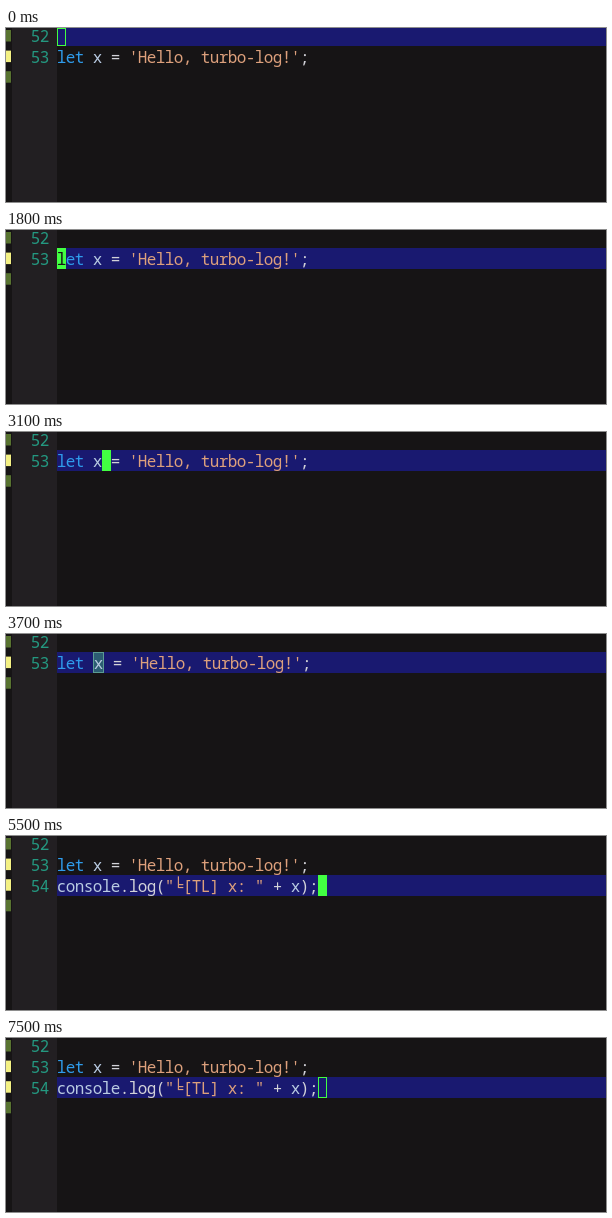
An HTML page with a canvas for the animation above (7.6 s loop, 600 by 174 pixels).

```html
<!DOCTYPE html>
<html lang="en">
<head>
<meta charset="utf-8">
<style>
html, body { margin: 0; width: 100%; height: 100%; overflow: hidden; background: #161415; }
canvas { display: block; }
</style>
</head>
<body>
<canvas id="stage" width="600" height="174"></canvas>
<script>
const ctx = document.getElementById('stage').getContext('2d');
const LOOP = 7600, CELL = 9, LEFT = 51, ROW = 21;
const BLUE = '#2f9cec', PALE = '#b9cbe2', LIGHT = '#d2d2d8', STRING = '#dda07c';
const GREEN = '#42ff42', NAVY = '#191970', DARK = '#161415';
const OLIVE = '#587330', YELLOW = '#f4f184';

const declaration = [['let', BLUE], [' x', PALE], [' = ', LIGHT], ["'Hello, turbo-log!'", STRING], [';', LIGHT]];
const logCall = [['console', PALE], ['.log(', LIGHT], ['"╘[TL] x: "', STRING], [' + ', LIGHT], ['x', PALE], [');', LIGHT]];

// Cursor timeline: [start ms, line, column, hollow]
const cursorSteps = [
  [0, 52, 0, true], [100, 52, 0, false], [600, 52, 0, true], [1100, 52, 0, false],
  [1800, 53, 0, false], [2300, 53, 0, true], [2600, 53, 3, false], [3000, 53, 5, false],
  [3200, 53, 4, false], [3600, 53, 4, true], [4100, 53, 4, false], [4600, 53, 4, true],
  [5100, 54, 29, false], [5600, 54, 29, true], [6100, 54, 29, false],
  [6600, 54, 29, true], [7100, 54, 29, false], [7500, 54, 29, true]
];

const rowTop = line => (line - 52) * ROW - 3;

function rect(x, y, w, h, color) {
  ctx.fillStyle = color;
  ctx.fillRect(x, y, w, h);
}

function glyph(char, x, line, color) {
  ctx.fillStyle = color;
  ctx.fillText(char, x + CELL / 2, rowTop(line) + 17);
}

function drawCode(parts, line, offset, cursor) {
  let column = 0;
  for (const [text, color] of parts) {
    for (const char of text) {
      const covered = cursor.line === line && cursor.column === column && !cursor.hollow;
      glyph(char, LEFT + column * CELL + offset(column), line, covered ? DARK : color);
      column++;
    }
  }
}

function drawGutter(inserted) {
  rect(6, 0, 45, 174, '#221f22');
  const marks = inserted ? [OLIVE, YELLOW, YELLOW, OLIVE] : [OLIVE, YELLOW, OLIVE];
  marks.forEach((color, i) => rect(0, 2 + i * 20.6, 5, 11.5, color));
  for (let line = 52; line <= (inserted ? 54 : 53); line++) {
    [...String(line)].forEach((digit, i) => glyph(digit, 25 + i * CELL, line, '#249880'));
  }
}

function drawCursor({ line, column, hollow }, marked) {
  const x = LEFT + column * CELL, width = marked ? 11 : CELL;
  const y = Math.max(0, rowTop(line)), height = rowTop(line + 1) - y;
  if (marked) rect(x, y + 1, width, height - 1, '#2c5d72');
  if (!hollow) {
    rect(x, y, width, height, GREEN);
    return;
  }
  ctx.strokeStyle = marked ? '#5b9c92' : GREEN;
  ctx.strokeRect(x + 0.5, y + 0.5, width - 1, height - 1);
}

function draw(time) {
  const [, line, column, hollow] = cursorSteps.findLast(step => step[0] <= time);
  const cursor = { line, column, hollow };
  const inserted = time >= 5100;
  const marked = time >= 3600 && !inserted;

  ctx.font = '16px "Noto Sans Mono", "DejaVu Sans Mono", monospace';
  ctx.textAlign = 'center';
  ctx.lineWidth = 1;
  rect(0, 0, 600, 174, DARK);
  drawGutter(inserted);
  rect(LEFT, rowTop(line), 549, ROW, NAVY);
  drawCursor(cursor, marked);

  // The box around the marked variable adds a pixel on each side.
  const boxOffset = col => !marked || col < 4 ? 0 : col === 4 ? 1 : 2;
  drawCode(declaration, 53, boxOffset, cursor);
  if (inserted) drawCode(logCall, 54, () => 0, cursor);
}

function tick() {
  draw(performance.now() % LOOP);
  requestAnimationFrame(tick);
}
tick();
</script>
</body>
</html>
```
